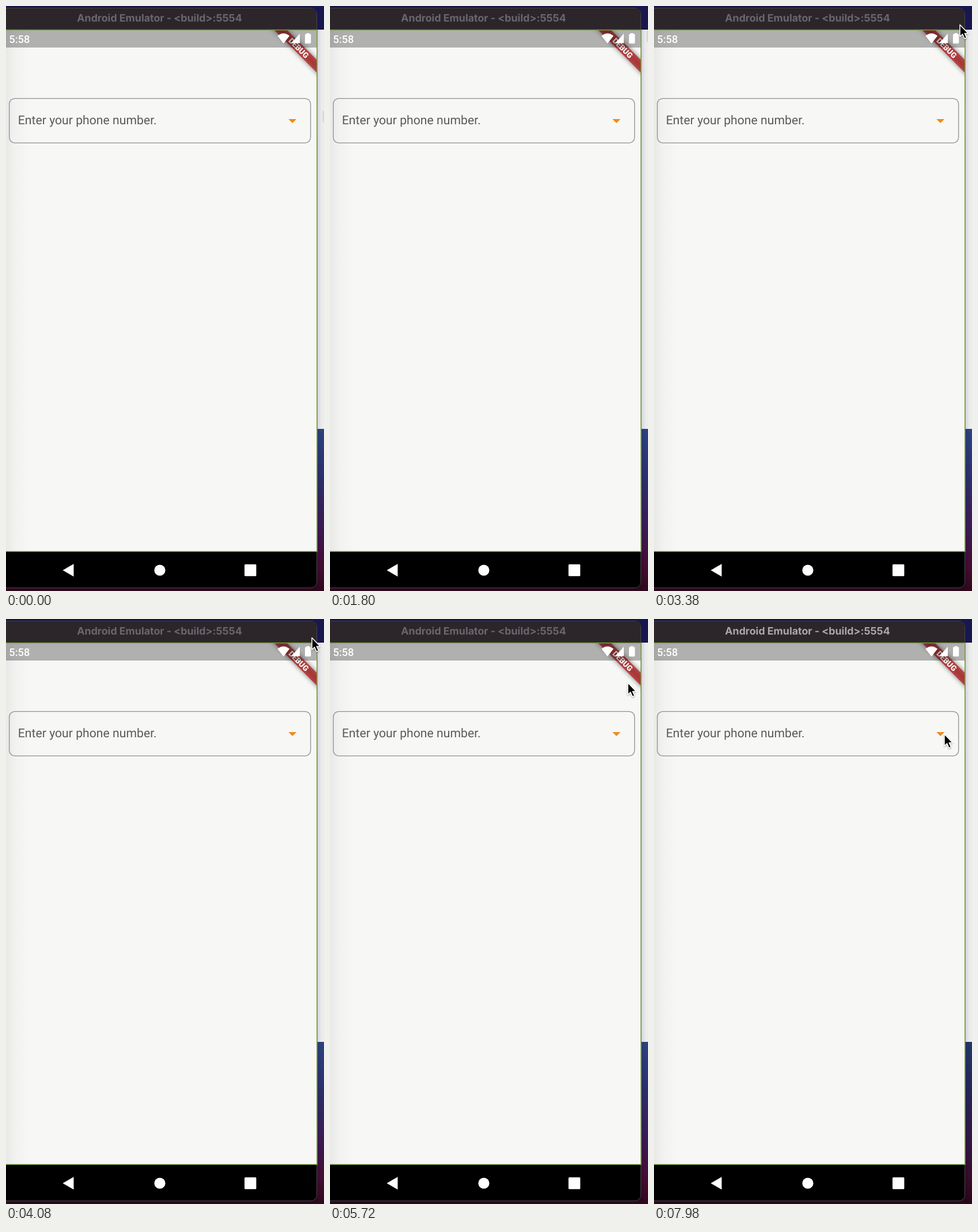
These frames come from a looping animation (552 by 1014 pixels, 8000 ms). An HTML page:

```html
<!DOCTYPE html>
<html lang="en">
<head>
<meta charset="utf-8">
<title>Phone number field</title>
<style>
  html, body { margin: 0; width: 100%; height: 100%; overflow: hidden; background: #15153f; }
  svg { display: block; width: 552px; height: 1014px; text-rendering: geometricPrecision; }
  .ui { font-family: Roboto, sans-serif; }
  .title { font: 700 17.8px Inter, sans-serif; text-anchor: middle; }
</style>
</head>
<body>
<svg viewBox="0 0 552 1014" xmlns="http://www.w3.org/2000/svg">
  <defs>
    <linearGradient id="wall" x1="0" y1="0" x2="0" y2="1">
      <stop offset="0" stop-color="#2b4380"/>
      <stop offset=".3" stop-color="#2c2f6c"/>
      <stop offset=".62" stop-color="#3c1a52"/>
      <stop offset=".85" stop-color="#460c33"/>
      <stop offset="1" stop-color="#32081c"/>
    </linearGradient>
    <linearGradient id="leftShade">
      <stop offset="0" stop-color="#e9e9e8"/>
      <stop offset=".4" stop-color="#f2f2f1"/>
      <stop offset="1" stop-color="#f7f7f6"/>
    </linearGradient>
    <linearGradient id="edgeShade">
      <stop offset="0" stop-opacity=".22"/>
      <stop offset="1" stop-opacity="0"/>
    </linearGradient>
    <clipPath id="screen"><rect y="42" width="539.5" height="903"/></clipPath>
    <filter id="soft" x="-20%" y="-150%" width="140%" height="400%"><feGaussianBlur stdDeviation="4.5"/></filter>
    <filter id="drop" x="-50%" y="-50%" width="220%" height="220%">
      <feDropShadow dx="0" dy="1.2" stdDeviation="1.2" flood-opacity=".4"/>
    </filter>
  </defs>

  <!-- desktop behind the window -->
  <rect width="552" height="1014" fill="#16163f"/>
  <rect x="530" width="22" height="41" fill="#18184e"/>
  <rect x="530" y="41" width="22" height="692" fill="#ececec"/>
  <rect x="530" y="733" width="22" height="281" fill="url(#wall)"/>
  <rect y="1000" width="540" height="14" fill="#2a0a1a"/>
  <rect x="540" y="41" width="8" height="973" fill="url(#edgeShade)" opacity=".5"/>
  <rect id="activeShade" x="540" y="733" width="12" height="281" fill="#000" opacity="0"/>
  <rect id="thumb" x="549.5" width="8" height="21" rx="3" fill="#d6d6d6"/>

  <!-- window -->
  <rect x="-12" y="3.5" width="551.5" height="1005" rx="10" fill="#000" stroke="#4a454a"/>
  <path d="M0 4H530Q539 4 539 13V41H0Z" fill="#2c262b"/>
  <text id="title" class="title" x="266.5" y="27">Android Emulator - &lt;build&gt;:5554</text>

  <!-- phone screen -->
  <g clip-path="url(#screen)">
    <rect y="42" width="540" height="904" fill="#f7f7f6"/>
    <rect y="42" width="42" height="904" fill="url(#leftShade)"/>
    <g transform="translate(539.4 41.5) rotate(45)">
      <rect x="-80" y="36.6" width="160" height="15.6" opacity=".5" filter="url(#soft)"/>
      <rect x="-80" y="36.6" width="160" height="15.6" fill="#b71c1c" fill-opacity=".72"/>
      <text class="ui" y="49.1" font-size="13.4" font-weight="900" text-anchor="middle" fill="#fff">DEBUG</text>
    </g>
    <rect y="42" width="540" height="30" opacity=".29"/>
  </g>
  <path d="M0 41.5H540V945.5H0" fill="none" stroke="#76a03c" stroke-width="1.6"/>

  <g fill="#fff">
    <text class="ui" x="5.3" y="63.5" font-size="18.3" font-weight="500">5:58</text>
    <path d="M481.7 65L471.3 51.8Q481.7 43.2 492.1 51.8Z"/>
    <path d="M510 48V64.5H495Z"/>
    <path d="M521.8 47H526.4V48.6H528Q529.3 48.6 529.3 50V63.6Q529.3 65 528 65H520.3Q519 65 519 63.6V50Q519 48.6 520.3 48.6H521.8Z"/>
    <path d="M98.5 978L117.5 967V989Z"/>
    <circle cx="267" cy="978" r="9.6"/>
    <rect x="414" y="967.8" width="20.4" height="20.4" rx="1.5"/>
  </g>

  <rect x="5.7" y="160.3" width="523" height="77" rx="9.5" fill="none" stroke="#909090" stroke-width="1.3"/>
  <text class="ui" x="20.8" y="205" font-size="21.2" fill="#5a5a5a">Enter your phone number.</text>
  <path d="M490.3 196H504.2L497.2 203Z" fill="#f08a1c"/>

  <path id="pointer" d="M0 0V20.5L4.6 16.2L8 24L11.6 22.4L8.3 15H14.4Z"
        fill="#000" stroke="#fff" stroke-width="1.5" stroke-linejoin="round" filter="url(#drop)"/>
</svg>
<script>
const LOOP = 8000;
const ACTIVATE = 7640;
const $ = id => document.getElementById(id);
const thumb = $('thumb'), title = $('title'), shade = $('activeShade'), pointer = $('pointer');

// time, x, y of the pointer tip
const path = [
  [2000, 556, 40], [2400, 531, 32.5], [5020, 531, 32.5], [5700, 517, 110.5],
  [5860, 517, 110.5], [6600, 510.5, 194.5], [7540, 510.5, 194.5], [7700, 504, 199.5]
];
const ease = p => p * p * (3 - 2 * p);
const progress = (t, from, to) => ease(Math.min(1, Math.max(0, (t - from) / (to - from))));
const mix = (a, b, p) => a + (b - a) * p;

function pointerAt(t) {
  const i = path.findIndex(key => key[0] > t);
  if (i === 0) return path[0].slice(1);
  if (i < 0) return path[path.length - 1].slice(1);
  const [t0, x0, y0] = path[i - 1], [t1, x1, y1] = path[i];
  const p = progress(t, t0, t1);
  return [mix(x0, x1, p), mix(y0, y1, p)];
}

function draw(t) {
  const [x, y] = pointerAt(t);
  pointer.setAttribute('transform', `translate(${x} ${y})`);
  pointer.setAttribute('visibility', t < path[0][0] ? 'hidden' : 'visible');
  thumb.setAttribute('y', mix(181, 42, progress(t, 20, 1560)));
  thumb.setAttribute('visibility', t < path[0][0] ? 'visible' : 'hidden');
  const active = t >= ACTIVATE;
  title.setAttribute('fill', active ? '#aaa7aa' : '#6a666b');
  shade.setAttribute('opacity', active ? .18 : 0);
}

const start = performance.now();
function tick() {
  draw((performance.now() - start) % LOOP);
  requestAnimationFrame(tick);
}
draw(0);
requestAnimationFrame(tick);
</script>
</body>
</html>
```
